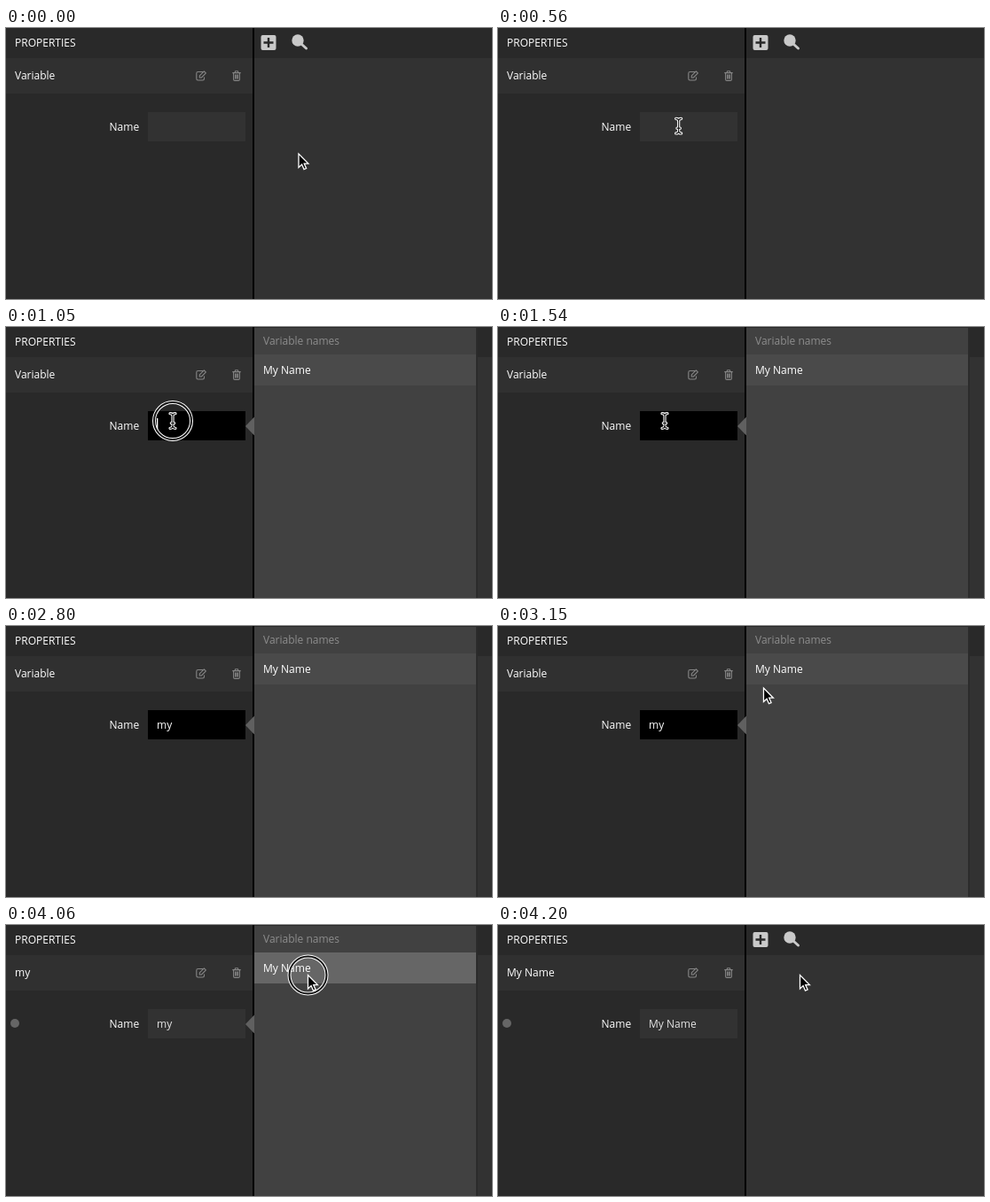
These frames come from a looping animation (548 by 306 pixels, 5.88 s). An HTML page:

```html
<!DOCTYPE html>
<html lang="en">
<head>
<meta charset="utf-8">
<title>Naming a variable</title>
<style>
  html, body { margin: 0; width: 100%; height: 100%; overflow: hidden; background: #2a2a2a; }
  svg { display: block; width: 548px; height: 306px; }
  text { font: 12px "Open Sans", "Noto Sans", sans-serif; fill: #fff; white-space: pre; }
  .icon { fill: none; stroke: #858585; stroke-width: 1.1; stroke-linejoin: round; }
  .tool { fill: #c9c9c9; }
  .muted { fill: #8d8d8d; }
</style>
</head>
<body>
<svg viewBox="0 0 548 306">
  <!-- properties pane -->
  <rect width="278" height="306" fill="#292929"/>
  <rect y="34" width="278" height="40" fill="#303030"/>
  <text x="10" y="21">PROPERTIES</text>
  <text id="title" x="10" y="58">Variable</text>
  <g class="icon">
    <path d="M222 49.5H216.5Q214.8 49.5 214.8 51.2V57.3Q214.8 59 216.5 59H221.8Q223.5 59 223.5 57.3V55.5"/>
    <path d="M218.3 56V53.8L223.3 48.8L225.4 50.9L220.4 56Z"/>
    <path d="M255.3 50.6H264.7M258 50.4L258.6 48.8H261.4L262 50.4M256.6 50.8V58Q256.6 59.4 258 59.4H262Q263.4 59.4 263.4 58V50.8M258.6 52.6V57.6M260 52.6V57.6M261.4 52.6V57.6"/>
  </g>
  <circle id="dot" cx="10" cy="111" r="5" fill="#666"/>
  <text x="116.5" y="116">Name</text>
  <rect id="field" x="160" y="95" width="110" height="33"/>
  <text id="value" x="170" y="116"></text>
  <rect id="caret" y="103" width="1.3" height="17" fill="#fff"/>

  <!-- canvas pane -->
  <rect x="280" width="268" height="306" fill="#323232"/>
  <rect x="280" width="268" height="34" fill="#292929"/>
  <rect x="278" width="2" height="306" fill="#000"/>
  <g class="tool">
    <rect x="287.5" y="8" width="17" height="17" rx="2"/>
    <path d="M296 11V22M290.5 16.5H301.5" stroke="#292929" stroke-width="2.4"/>
    <circle cx="329" cy="14" r="6.7"/>
    <path d="M333 18L338.5 23" stroke="#c9c9c9" stroke-width="3" stroke-linecap="round"/>
  </g>

  <!-- suggestions -->
  <g id="panel">
    <rect x="530" y="1" width="2" height="305" fill="#2b2b2b"/>
    <rect x="280" y="1" width="250" height="305" fill="#414141"/>
    <rect id="row" x="280" y="31" width="250" height="35"/>
    <path d="M270 112L280 101.5V122.5Z" fill="#606060"/>
    <text class="muted" x="290" y="20">Variable names</text>
    <text x="290" y="53">My Name</text>
  </g>

  <!-- pointer -->
  <g id="pointer">
    <g id="ring" fill="none">
      <circle stroke="#fff" stroke-width="4"/>
      <circle stroke="#111" stroke-width="2"/>
    </g>
    <path id="arrow" d="M0 0V15.4L3.6 12.1L6 17.6L8.6 16.5L6.2 11.1H10.9Z"
          fill="#000" stroke="#fff" stroke-width="1.3"/>
    <g id="beam" fill="none" stroke-linecap="round">
      <path id="stem" d="M-3 -8.3Q0 -8.3 0 -5.5V5.5Q0 8.3 -3 8.3M3 -8.3Q0 -8.3 0 -5.5V5.5Q0 8.3 3 8.3M-1.7 2.5H1.7"
            stroke="#fff" stroke-width="3.2"/>
      <use href="#stem" style="display:none"/>
      <path d="M-3 -8.3Q0 -8.3 0 -5.5V5.5Q0 8.3 -3 8.3M3 -8.3Q0 -8.3 0 -5.5V5.5Q0 8.3 3 8.3M-1.7 2.5H1.7"
            stroke="#111" stroke-width="1.1"/>
    </g>
  </g>
</svg>
<script>
  const LOOP = 5880, STEP = 70;
  const $ = id => document.getElementById(id);
  const show = (id, on) => { $(id).style.display = on ? '' : 'none'; };
  const within = (s, from, to) => s >= from && s < to;

  // Pointer legs: start step, end step, from, to, eased
  const legs = [
    [4, 9, [330, 142], [189, 107], true],
    [10, 12, [189, 107], [188, 106], false],
    [41, 47, [188, 106], [338.5, 57.5], true],
    [47, 49, [338.5, 57.5], [340.5, 56.5], false]
  ];

  function pointerAt(s) {
    let pos = legs[0][2];
    for (const [start, end, from, to, eased] of legs) {
      if (s < start) break;
      let u = Math.min(1, (s - start) / (end - start));
      if (eased) u = u * u * (3 - 2 * u);
      pos = from.map((v, i) => v + (to[i] - v) * u);
    }
    return pos;
  }

  function ringRadius(s) {
    if (within(s, 12, 16)) return 16 + (s - 14) * 5;
    return within(s, 58, 60) ? 21 : 0;
  }

  function render(s) {
    const focused = within(s, 15, 58);
    const typed = s >= 60 ? 'My Name' : s >= 32 ? 'my' : s >= 28 ? 'm' : '';
    $('value').textContent = typed;
    $('value').style.fill = focused ? '#fff' : '#e4e4e4';
    $('title').textContent = s >= 58 ? typed : 'Variable';
    $('field').setAttribute('fill', focused ? '#000' : '#323232');
    show('dot', s >= 58);

    show('caret', within(s, 15, 22) || within(s, 28, 40) || within(s, 47, 55));
    $('caret').setAttribute('x', 170 + (typed ? $('value').getComputedTextLength() : 0));

    const [x, y] = pointerAt(s);
    const open = within(s, 15, 60);
    const hover = open && x > 280 && y > 31 && y < 66;
    show('panel', open);
    $('row').setAttribute('fill', hover ? '#666' : '#4a4a4a');

    const overField = within(x, 160, 270) && within(y, 95, 128);
    show('pointer', !within(s, 28, 42));
    show('beam', overField);
    show('arrow', !overField);
    $('pointer').setAttribute('transform', `translate(${x} ${y})`);

    const r = ringRadius(s);
    show('ring', r > 0);
    for (const c of $('ring').children) c.setAttribute('r', r);
  }

  const begin = performance.now();
  function tick() {
    render(Math.floor((performance.now() - begin) % LOOP / STEP));
    requestAnimationFrame(tick);
  }
  tick();
</script>
</body>
</html>
```
